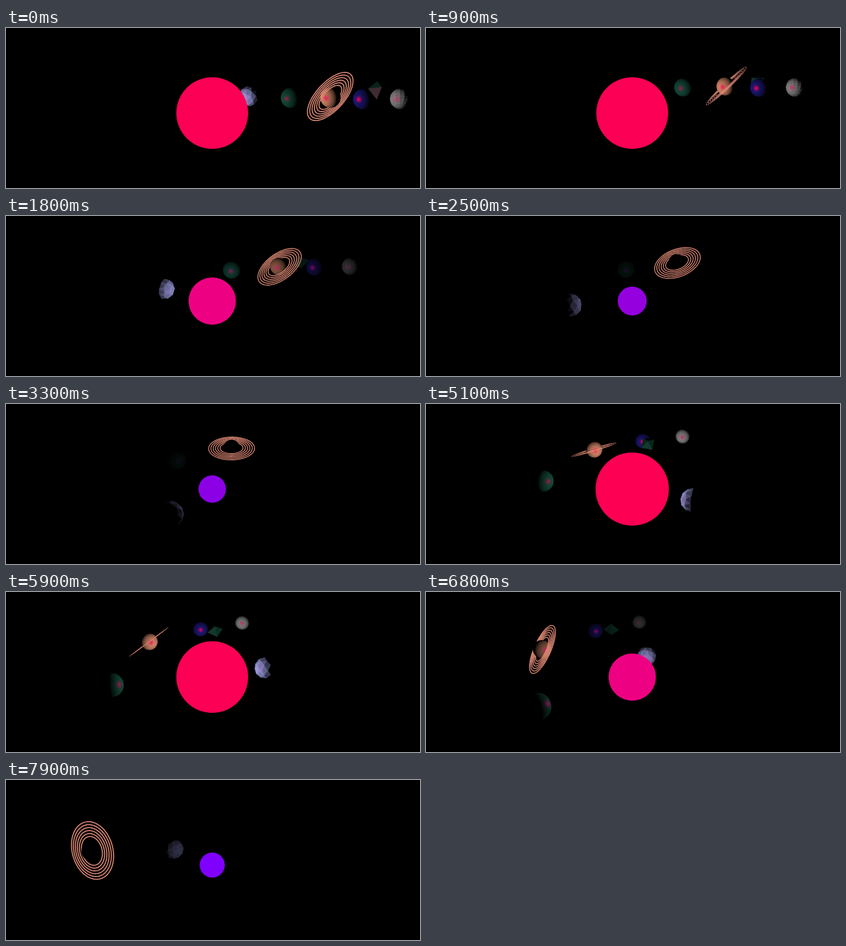
These frames come from a looping animation (800x310 px, 8 s). An HTML page with a canvas:

```html
<!DOCTYPE html>
<html lang="en">
<head>
<meta charset="utf-8">
<title>Pulsing star</title>
<style>
html, body { margin: 0; width: 100%; height: 100%; overflow: hidden; background: #000; }
canvas { display: block; }
</style>
</head>
<body>
<canvas id="stage" width="800" height="310"></canvas>
<script>
const ctx = document.getElementById('stage').getContext('2d');
const LOOP = 8000, STEP = 100;
// Star centre, camera elevation (sine, cosine), focal length in px
const CX = 398.5, CY = 164.8, RISE = 0.43, AWAY = 0.903, FOCAL = 575;
const SIZE = 22, RING = 62.5, RAD = Math.PI / 180;

// ---- small maths helpers ----
const clamp = (v, a, b) => Math.max(a, Math.min(b, v));
const dot = (a, b) => a[0] * b[0] + a[1] * b[1] + a[2] * b[2];
const cross = (a, b) => [
  a[1] * b[2] - a[2] * b[1], a[2] * b[0] - a[0] * b[2], a[0] * b[1] - a[1] * b[0]
];
const unit = v => {
  const l = Math.hypot(...v) || 1;
  return v.map(c => c / l);
};
const mean = pts => [0, 1, 2].map(i => pts.reduce((s, p) => s + p[i], 0) / pts.length);

function linear(xs, ys, x) {
  let i = 0;
  while (i < xs.length - 2 && x > xs[i + 1]) i++;
  return ys[i] + (ys[i + 1] - ys[i]) * clamp((x - xs[i]) / (xs[i + 1] - xs[i]), 0, 1);
}

// Smooth curve through points at uneven times
function spline(ts, vs, t) {
  const last = ts.length - 1;
  let i = 0;
  while (i < last - 1 && t > ts[i + 1]) i++;
  const slope = k => {
    const a = Math.max(0, k - 1), b = Math.min(last, k + 1);
    return (vs[b] - vs[a]) / (ts[b] - ts[a]);
  };
  const h = ts[i + 1] - ts[i], u = (t - ts[i]) / h, u2 = u * u, u3 = u2 * u;
  return vs[i] * (2 * u3 - 3 * u2 + 1) + vs[i + 1] * (3 * u2 - 2 * u3) +
    h * (slope(i) * (u3 - 2 * u2 + u) + slope(i + 1) * (u3 - u2));
}

// ---- solids ----
function icosahedron() {
  const g = (1 + Math.sqrt(5)) / 2, v = [], faces = [];
  for (const a of [-1, 1]) for (const b of [-g, g]) v.push([0, a, b], [a, b, 0], [b, 0, a]);
  const near = (p, q) => Math.hypot(p[0] - q[0], p[1] - q[1], p[2] - q[2]) < 2.1;
  for (let i = 0; i < 12; i++)
    for (let j = i + 1; j < 12; j++)
      for (let k = j + 1; k < 12; k++)
        if (near(v[i], v[j]) && near(v[j], v[k]) && near(v[i], v[k]))
          faces.push([v[i], v[j], v[k]].map(unit));
  return faces;
}

function subdivide(faces) {
  return faces.flatMap(([a, b, c]) => {
    const ab = unit(mean([a, b])), bc = unit(mean([b, c])), ca = unit(mean([c, a]));
    return [[a, ab, ca], [ab, b, bc], [ca, bc, c], [ab, bc, ca]];
  });
}

function octahedron() {
  const faces = [];
  for (const a of [-1, 1]) for (const b of [-1, 1]) for (const c of [-1, 1])
    faces.push([[a, 0, 0], [0, b, 0], [0, 0, c]]);
  return faces;
}

function globe(cols, rows) {
  const at = (i, j) => {
    const u = i / cols * 2 * Math.PI, v = j / rows * Math.PI;
    return [Math.sin(v) * Math.cos(u), Math.cos(v), Math.sin(v) * Math.sin(u)];
  };
  const faces = [];
  for (let i = 0; i < cols; i++)
    for (let j = 0; j < rows; j++)
      faces.push([at(i, j), at(i + 1, j), at(i + 1, j + 1), at(i, j + 1)]);
  return faces;
}

// ---- the planets: orbit radius, start angle, degrees per ms ----
const KEYS = [0, 1800, 3300, 4300, 5900, 6800, 7900];
const bodies = [
  { a: 118, start: 47, speed: 0.0568, color: [132, 132, 190], gloss: 0.1,
    mesh: subdivide(icosahedron()), spin: [0.5, 0.0004, 0.3, 0.0007] },
  { a: 187, start: 24.3, speed: 0.0282, color: [17, 68, 53], gloss: 0.5 },
  { a: 268, start: 16.9, speed: 0.01872, color: [228, 145, 112], gloss: 0.7, ringed: true },
  { a: 310, color: [18, 74, 56], gloss: 0.5, mesh: octahedron(), spin: [0.4, 0.0003, 0.5, 0.0004],
    xs: [717, 571, 493, 452, 404, 358, 312], ys: [121, 91, 82, 79, 75, 73, 77] },
  { a: 331, start: 12.2, speed: 0.0142, color: [32, 28, 140], gloss: 0.95 },
  { a: 410, start: 10, speed: 0.0113, color: [195, 195, 195], gloss: 0.75,
    mesh: globe(14, 10), spin: [0.4, 0.0002, 0.2, 0.0003] }
];

function place(b, t) {
  let x, y, c, s;
  if (b.xs) {
    x = spline(KEYS, b.xs, t);
    y = spline(KEYS, b.ys, t);
    [c, s] = unit([x - CX, (CY - y) / RISE]);
  } else {
    const th = (b.start + b.speed * t) * RAD;
    c = Math.cos(th);
    s = Math.sin(th);
  }
  const p = 1 / (1 + b.a * AWAY / FOCAL * s);
  if (!b.xs) {
    x = CX + b.a * c * p;
    y = CY - b.a * RISE * s * p;
  }
  // Light direction as seen along the line of sight to this planet
  const eye = unit([(CX - x) / FOCAL, (CY - y) / FOCAL, 1]);
  const right = unit([eye[2], 0, -eye[0]]);
  const sun = unit([-c, s * RISE, s * AWAY]);
  const light = [dot(sun, right), dot(sun, cross(eye, right)), dot(sun, eye)];
  const half = unit([light[0], light[1], light[2] + 1]);
  return { b, x, y, p, eye, light, half, r: SIZE * p };
}

// ---- lighting ----
function starAt(t) {
  const c = Math.cos((t - 450) / 5000 * 2 * Math.PI);
  const xs = [-1, -0.905, -0.125, 0.125, 0.844, 1];
  return {
    r: 48.7 + 24.5 * c,
    reach: 650 + 450 * c,
    color: [
      linear(xs, [128, 140, 238, 251, 251, 255], c), 0,
      linear(xs, [255, 230, 131, 109, 85, 80], c)
    ]
  };
}

function shade(n, o, star) {
  const facing = dot(n, o.light);
  if (facing <= 0) return [0, 0, 0];
  const power = 1.4 * Math.pow(Math.max(0, 1 - o.b.a / star.reach), 1.5);
  const diffuse = Math.pow(facing, 0.7) * power;
  const shine = Math.pow(Math.max(0, dot(n, o.half)), 30) * o.b.gloss * Math.min(1, power * 1.2);
  return o.b.color.map((v, i) => {
    const base = v * diffuse;
    return base + (star.color[i] - base) * shine;
  });
}

// ---- drawing ----
const PAD = 80;
const patch = document.createElement('canvas');
patch.width = patch.height = PAD;
const pctx = patch.getContext('2d');
const img = pctx.createImageData(PAD, PAD);

function drawSphere(o, star) {
  const left = Math.floor(o.x) - PAD / 2, top = Math.floor(o.y) - PAD / 2;
  for (let j = 0, k = 0; j < PAD; j++) {
    for (let i = 0; i < PAD; i++, k += 4) {
      const dx = left + i + 0.5 - o.x, dy = top + j + 0.5 - o.y, d = Math.hypot(dx, dy);
      const cover = clamp(o.r - d + 0.5, 0, 1);
      img.data[k + 3] = cover * 255;
      if (!cover) continue;
      const nx = dx / o.r, ny = dy / o.r;
      const rgb = shade([nx, ny, Math.sqrt(Math.max(0, 1 - nx * nx - ny * ny))], o, star);
      for (let m = 0; m < 3; m++) img.data[k + m] = rgb[m];
    }
  }
  pctx.putImageData(img, 0, 0);
  ctx.drawImage(patch, left, top);
}

function drawMesh(o, star, t) {
  const [ax, vx, ay, vy] = o.b.spin;
  const cx = Math.cos(ax + vx * t), sx = Math.sin(ax + vx * t);
  const cy = Math.cos(ay + vy * t), sy = Math.sin(ay + vy * t);
  const turn = ([x, y, z]) => {
    const u = x * cy + z * sy, w = z * cy - x * sy;
    return [u, y * cx - w * sx, y * sx + w * cx];
  };
  ctx.lineWidth = 0.5;
  for (const face of o.b.mesh) {
    const pts = face.map(turn), n = unit(mean(pts));
    if (n[2] <= 0) continue;
    ctx.fillStyle = ctx.strokeStyle = `rgb(${shade(n, o, star).map(Math.round)})`;
    ctx.beginPath();
    for (const p of pts) ctx.lineTo(o.x + p[0] * o.r, o.y + p[1] * o.r);
    ctx.closePath();
    ctx.fill();
    ctx.stroke();
  }
}

// Axis of the ring system: right, down, towards the viewer
const AXIS = [
  [-0.47, -0.623, -0.04, 0, -0.58, -0.744, -0.45],
  [-0.588, -0.615, -0.795, -0.949, -0.78, -0.335, 0.19],
  [-0.659, 0.483, 0.606, 0.315, 0.225, 0.578, 0.88]
];

function ringAxis(t) {
  return unit(AXIS.map(vs => spline(KEYS, vs, t)));
}

function drawRings(o, n, front) {
  const u = unit(cross(n, o.eye)), v = cross(n, u);
  const side = front === dot(v, o.eye) > 0 ? 1 : -1;
  const flat = Math.abs(dot(n, o.eye));
  const mid = [(o.x - CX) / o.p, (o.y - CY) / o.p, -FOCAL / o.p];
  ctx.save();
  ctx.strokeStyle = '#dc8874';
  ctx.lineWidth = 2.2 * o.p * clamp(0.45 + flat * 1.6, 0.5, 1);
  if (flat < 0.28) ctx.setLineDash([2.2, 1.3]);
  for (let i = 0; i < 6; i++) {
    const r = RING * (1 - i * 0.1);
    ctx.beginPath();
    for (let k = 0; k <= 48; k++) {
      const w = k / 48 * Math.PI, a = r * Math.cos(w), b = r * Math.sin(w) * side;
      const q = mid.map((m, j) => m + a * u[j] + b * v[j]);
      ctx.lineTo(CX - q[0] * FOCAL / q[2], CY - q[1] * FOCAL / q[2]);
    }
    ctx.stroke();
  }
  ctx.restore();
}

function drawStar(star) {
  ctx.fillStyle = `rgb(${star.color.map(Math.round)})`;
  ctx.beginPath();
  ctx.arc(CX, CY, star.r, 0, 2 * Math.PI);
  ctx.fill();
}

function drawBody(o, star, t) {
  const axis = o.b.ringed && ringAxis(t);
  if (axis) drawRings(o, axis, false);
  if (o.b.mesh) drawMesh(o, star, t);
  else drawSphere(o, star);
  if (axis) drawRings(o, axis, true);
}

function draw(t) {
  const star = starAt(t);
  ctx.fillStyle = '#000';
  ctx.fillRect(0, 0, 800, 310);
  const list = bodies.map(b => place(b, t));
  list.push({ y: CY });
  list.sort((p, q) => p.y - q.y);
  for (const o of list) o.b ? drawBody(o, star, t) : drawStar(star);
}

const begin = performance.now();
let shown = -1;
function tick() {
  const t = Math.floor((performance.now() - begin) % LOOP / STEP) * STEP;
  if (t !== shown) draw(shown = t);
  requestAnimationFrame(tick);
}
tick();
</script>
</body>
</html>
```
